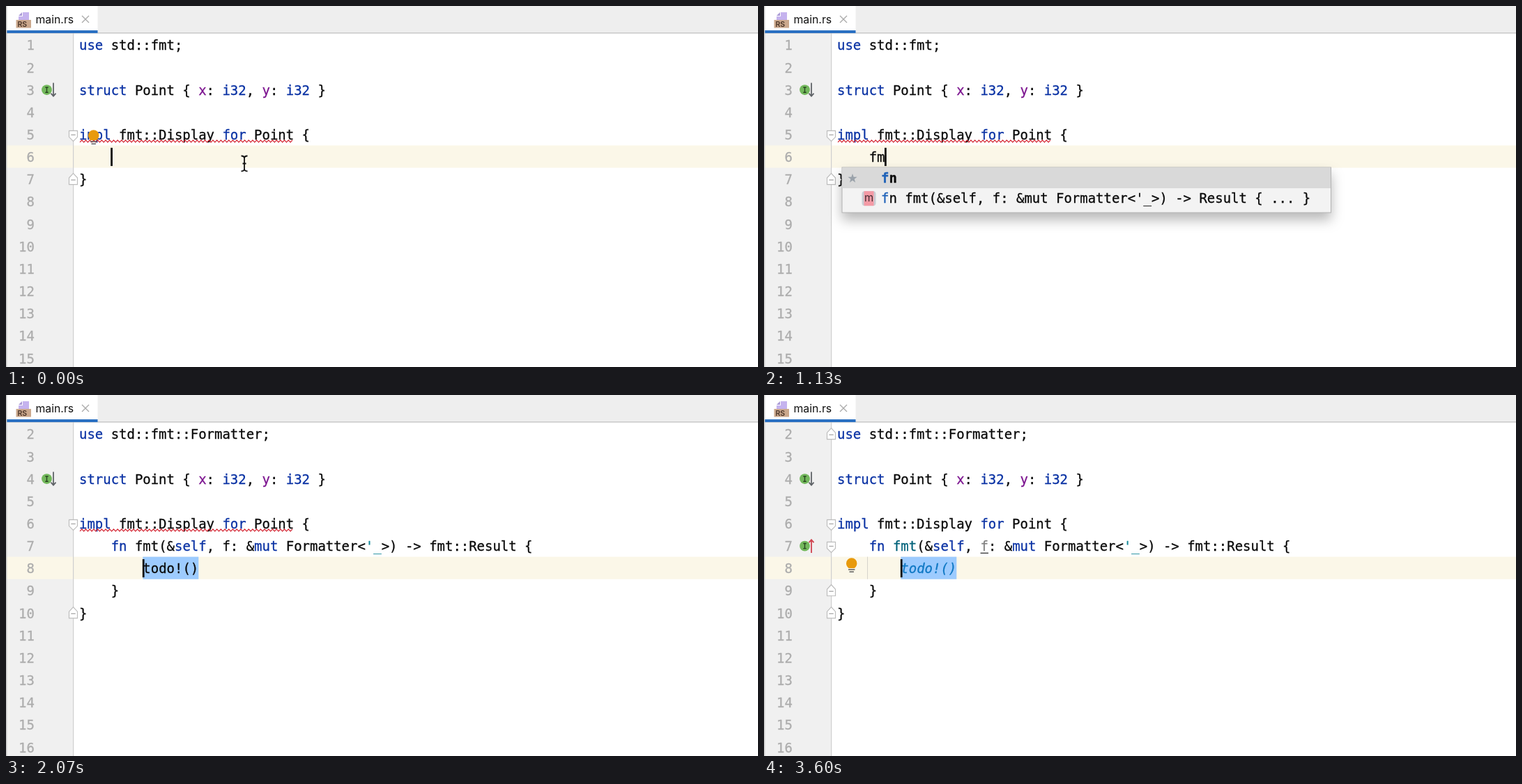
An HTML page for the animation above (3670 ms loop, 1079x519 px).

```html
<!DOCTYPE html>
<html lang="en">
<head>
<meta charset="utf-8">
<title>Implementing a trait method with completion</title>
<style>
  html, body { margin: 0; width: 100%; height: 100%; overflow: hidden; background: #fff; }
  svg { display: block; width: 1079px; height: 519px; }
  .code {
    font: 18.97px "DejaVu Sans Mono", "Noto Sans Mono", monospace; white-space: pre; color: #0a0a0a;
  }
  .code, .code tspan { fill: currentColor; stroke: currentColor; stroke-width: .3; }
  .code.num { color: #adadad; text-anchor: end; }
  .ui { font-family: Inter, Roboto, sans-serif; }
  .k { color: #0a32a4; }
  .p { color: #7d1590; }
  .l { color: #16899a; }
  .fn { color: #00627a; }
  .u { color: #808080; }
  .mac { color: #0f78c4; font-style: italic; }
  .hit { color: #1f62b8; }
  .bold { font-weight: bold; }
  .fold { fill: #fff; stroke: #bdbdbd; stroke-width: 1.2; }
  .popup { filter: drop-shadow(0 10px 9px rgba(0, 0, 0, .28)); }
</style>
</head>
<body>
<svg id="stage" viewBox="0 0 1079 519" xmlns="http://www.w3.org/2000/svg"></svg>
<script>
const LOOP = 3670;
const LEFT = 105, CHAR = 11.42, TOP = 39.7, ROW = 32.15, BASE = 23.7;

// Times of the events, in ms.
const T = {
  caretOff: 400, typeF: 930, popup: 1070, typeM: 1130, filter: 1200, caretOff2: 1530,
  accept: 1930, insert: 2070, folds: 2270, annotate: 2470, bulb: 2600, caretOff3: 2670, caretOn: 3200
};

const colX = col => LEFT + CHAR * col;
const rowY = row => TOP + ROW * row;
const rect = (x, y, w, h, fill, extra = '') =>
  `<rect x="${x}" y="${y}" width="${w}" height="${h}" fill="${fill}" ${extra}/>`;
const path = (d, stroke, width, extra = 'fill="none"') =>
  `<path d="${d}" stroke="${stroke}" stroke-width="${width}" ${extra}/>`;

// Coloured runs are written as [class|text].
const paint = s => s.replace(/&/g, '&amp;').replace(/</g, '&lt;')
  .replace(/\[(\w+)\|([^\]]*)\]/g, '<tspan class="$1">$2</tspan>');
const text = (x, y, s, cls = '') => `<text class="code ${cls}" x="${x}" y="${y}">${paint(s)}</text>`;
const code = (row, s, col = 0) => text(colX(col), rowY(row) + BASE, s);

function fold(row, closing) {
  const y = rowY(row);
  const [flat, shoulder, tip, dash] = closing ? [24, 14.5, 8, 17.5] : [11, 20, 26, 17];
  return `<path class="fold" d="M90.5 ${y + flat}H102.5V${y + shoulder}L96.5 ${y + tip}L90.5 ${y + shoulder}Z"/>` +
    path(`M93.3 ${y + dash}h6.4`, '#a8a8a8', 1.3);
}

function marker(row, up) {
  const y = rowY(row) + 16.6;
  const arrow = up
    ? path(`M68 ${y + 10}V${y - 9}M64.5 ${y - 5}L68 ${y - 9}L71.5 ${y - 5}`, '#d04450', 1.8)
    : path(`M68 ${y - 10}V${y + 9}M64.5 ${y + 5}L68 ${y + 9}L71.5 ${y + 5}`, '#606468', 1.8);
  return `<circle cx="58.5" cy="${y}" r="7.4" fill="#73b85c"/>` +
    path(`M56.3 ${y - 3.6}h4.4M58.5 ${y - 3.6}v7.2M56.3 ${y + 3.6}h4.4`, '#27451f', 1.4) + arrow;
}

function bulb(y) {
  return `<path d="M118 ${y}a7.7 7.7 0 1 1 15.4 0q0 4-3.6 7h-8.2q-3.6-3-3.6-7z" fill="#e89a0c"/>` +
    path(`M121 ${y + 9}h9.4M122.5 ${y + 12.2}h6.4`, '#5c5c5c', 1.5);
}

function squiggle(row) {
  const y = rowY(row) + 27.6;
  let d = `M${LEFT + 1} ${y}`;
  for (let x = LEFT + 1, i = 1; x < 410; i++) d += `L${x += 2.85} ${y - (i % 2 ? 3 : 0)}`;
  return path(d, '#d3202e', 1.2);
}

const caret = (row, col) => rect(colX(col) - .5, rowY(row) + 3.4, 2.7, 26.2, '#000');

const pointer = () =>
  path('M337.5 215.5q4.5 0 4.5 3.5v15q0 3.5-4.5 3.5M346.5 215.5q-4.5 0-4.5 3.5v15q0 3.5 4.5 3.5M339.5 226.5h5', '#111', 1.8);

function frame(firstLine, activeRow) {
  let s = rect(0, 0, 1079, 519, '#fff') + rect(0, 39, 96, 480, '#f0f0f0') +
    rect(0, rowY(activeRow), 1079, ROW, '#fbf7e8') +
    rect(96, 39, 1.2, 480, '#cfcfcf') +
    rect(0, 0, 1079, 38, '#eeeeee') + rect(0, 38, 1079, 1.6, '#cbcbcb') +
    rect(1, 0, 130.5, 35, '#fff') + rect(1, 35, 130.5, 4, '#2a70c2') +
    rect(0, 0, 1.4, 519, '#c6c6c6');
  s += '<path d="M24 9H33V20H18V15H24Z" fill="#c5b3ee"/><path d="M18 14L23 9V14Z" fill="#a999d6"/>' +
    rect(14.5, 20, 21.5, 11.5, '#cba88c') +
    '<text class="ui" x="16.5" y="29.6" font-size="10.5" font-weight="600" fill="#4a3528">RS</text>' +
    '<text class="ui" x="42.5" y="25" font-size="15.8" fill="#111">main.rs</text>' +
    path('M109 14L119 24M119 14L109 24', '#a9a9a9', 1.3);
  for (let row = 0; row < 15; row++) s += text(40.8, rowY(row) + BASE, String(firstLine + row), 'num');
  return s;
}

const STRUCT = '[k|struct] Point { [p|x]: [k|i32], [p|y]: [k|i32] }';
const IMPL = '[k|impl] fmt::Display [k|for] Point {';
const ITEM_TAIL = '(&self, f: &mut Formatter<\'_>) -> Result { ... }';

function methodItem(y, label) {
  return rect(140.5, y - 10.5, 20, 21, '#c9ced4', 'rx="4"') + rect(143.5, y - 10.5, 14, 21, '#f49aa5') +
    `<text class="ui" x="150.5" y="${y + 4.5}" font-size="15" text-anchor="middle" fill="#3d2b30">m</text>` +
    text(168, y + 6.6, label + ITEM_TAIL);
}

function popup(filtered) {
  const height = filtered ? 35 : 65;
  let s = rect(112, 232, 701.5, height, '#f3f3f3', 'class="popup" stroke="#b4b4b4"') +
    rect(112.5, 232.5, 700.5, 29.5, '#d9d9d9');
  if (filtered) return s + methodItem(247.5, 'fn [hit|fm]t');
  let star = '';
  for (let i = 0; i < 10; i++) {
    const a = Math.PI * (i / 5 - .5), r = i % 2 ? 2.8 : 7;
    star += `${127 + r * Math.cos(a)},${248 + r * Math.sin(a)} `;
  }
  return s + `<polygon points="${star}" fill="#9aa2aa"/>` +
    text(168, 254.3, '[hit|f]n', 'bold') + methodItem(276.7, '[hit|f]n fmt');
}

function beforeInsert(t) {
  const typed = t < T.typeF ? '' : t < T.typeM ? 'f' : 'fm';
  const caretOn = t < T.caretOff || (t >= T.typeF && t < T.caretOff2);
  let s = frame(1, 5) + code(0, '[k|use] std::fmt;') + code(2, STRUCT) + marker(2) +
    code(4, IMPL) + squiggle(4) + code(5, typed, 4) + code(6, '}') + fold(4) + fold(6, true);
  if (t < T.typeF) s += bulb(186) + pointer();
  if (caretOn) s += caret(5, 4 + typed.length);
  if (t >= T.popup && t < T.accept) s += popup(t >= T.filter);
  return s;
}

function afterInsert(t) {
  const folds = t >= T.folds, done = t >= T.annotate;
  const name = done ? '[fn|fmt]' : 'fmt', param = done ? '[u|f]' : 'f';
  let s = frame(2, 6) + code(0, '[k|use] std::fmt::Formatter;') + code(2, STRUCT) + marker(2) + code(4, IMPL) +
    code(5, `[k|fn] ${name}(&[k|self], ${param}: &[k|mut] Formatter<[l|'_]>) -> fmt::Result {`, 4) +
    rect(colX(8), rowY(6), CHAR * 7, ROW, '#9dcbfe') +
    code(6, done ? '[mac|todo!()]' : 'todo!()', 8) + code(7, '}', 4) + code(8, '}') +
    fold(4) + fold(8, true);
  if (folds) s += fold(0, true) + fold(5) + fold(7, true) + rect(148, rowY(6), 1, ROW, '#d6d4cb');
  if (done) s += marker(5, true) + rect(colX(18), rowY(5) + 26.2, CHAR, 1.3, '#333');
  else s += squiggle(4);
  if (t >= T.bulb) s += bulb(242);
  if (t < T.caretOff3 || t >= T.caretOn) s += caret(6, 8);
  return s;
}

const stage = document.getElementById('stage');
const times = Object.values(T);
let shown = -1;

function draw(t) {
  const step = times.filter(start => start <= t).length;
  if (step === shown) return;
  shown = step;
  stage.innerHTML = t < T.insert ? beforeInsert(t) : afterInsert(t);
}

const start = performance.now();
function tick() {
  draw((performance.now() - start) % LOOP);
  requestAnimationFrame(tick);
}
tick();
</script>
</body>
</html>
```
